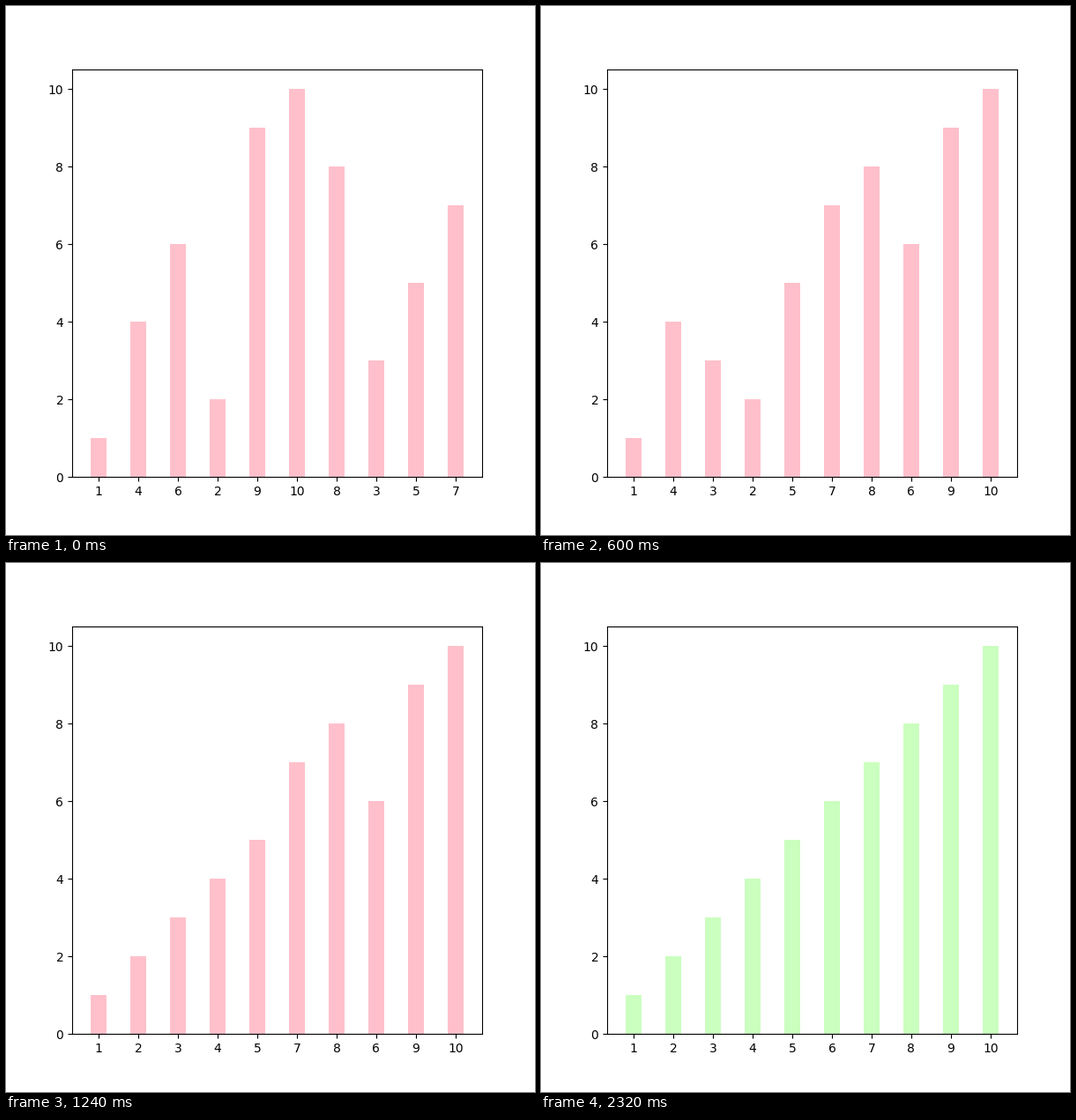
These frames come from a looping animation (600 px wide and 600 px high, 2800 ms). A matplotlib script:

```python
import matplotlib.pyplot as plt
from matplotlib.animation import FuncAnimation

START = [1, 4, 6, 2, 9, 10, 8, 3, 5, 7]
STEP_MS = 200
STEPS = 14
BUSY, DONE = "pink", "#caffbf"


def quicksort(a, lo, hi):
    """Sort a[lo..hi] in place, yielding the list after every swap."""
    if a[lo:hi + 1] == sorted(a[lo:hi + 1]):
        return
    pivot = a[(lo + hi + 1) // 2]
    i, j = lo, hi
    while i <= j:
        while a[i] < pivot:
            i += 1
        while a[j] > pivot:
            j -= 1
        if i <= j:
            a[i], a[j] = a[j], a[i]
            yield a.copy()
            i += 1
            j -= 1
    yield from quicksort(a, lo, j)
    yield from quicksort(a, i, hi)


states = [START, *quicksort(START.copy(), 0, len(START) - 1)]

fig, ax = plt.subplots(figsize=(6, 6), dpi=100)
slots = range(len(START))
bars = ax.bar(slots, START, width=0.4, color=BUSY)


def draw(step):
    values = states[min(step, len(states) - 1)]
    color = DONE if values == sorted(values) else BUSY
    for bar, value in zip(bars, values):
        bar.set_height(value)
        bar.set_facecolor(color)
    ax.set_xticks(slots, labels=values)
    return bars.patches


anim = FuncAnimation(fig, draw, frames=STEPS, interval=STEP_MS,
                     repeat=True, repeat_delay=0)
plt.show()
```
